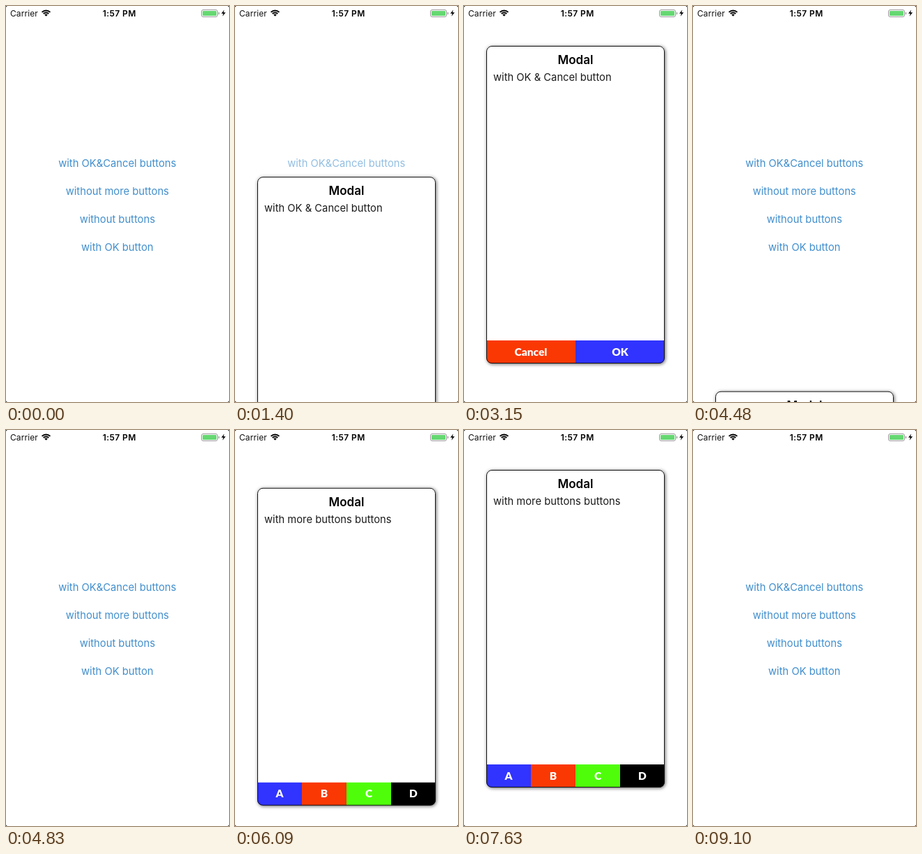
An HTML page with a canvas for the animation above (9.38 s loop, 320 by 566 pixels).

```html
<!DOCTYPE html>
<html lang="en">
<head>
<meta charset="utf-8">
<title>Modal demo</title>
<style>
  html, body { margin: 0; width: 100%; height: 100%; overflow: hidden; background: #000; }
  canvas { display: block; width: 320px; height: 566px; }
</style>
</head>
<body>
<canvas id="stage"></canvas>
<script>
const W = 320, H = 566, LOOP = 9380;
const canvas = document.getElementById('stage');
const ctx = canvas.getContext('2d');
const dpr = window.devicePixelRatio || 1;
canvas.width = W * dpr;
canvas.height = H * dpr;

const RED = '#fa3803', BLUE = '#3134fe', GREEN = '#4ffd0a', BLACK = '#000';
const links = ['with OK&Cancel buttons', 'without more buttons', 'without buttons', 'with OK button'];
const modals = [
  { link: 0, press: 1190, release: 1260, open: 1275, close: 4285,
    body: 'with OK & Cancel button', buttons: [['Cancel', RED], ['OK', BLUE]] },
  { link: 1, press: 5670, release: 5810, open: 5825, close: 8625,
    body: 'with more buttons buttons', buttons: [['A', BLUE], ['B', RED], ['C', GREEN], ['D', BLACK]] },
];

// Critically damped spring from 0 to 1, time in ms.
function spring(ms) {
  const x = Math.max(0, ms) * 0.01826;
  return 1 - (1 + x) * Math.exp(-x);
}

function text(str, x, y, font, color, align = 'center', spacing = 0) {
  ctx.font = font;
  ctx.fillStyle = color;
  ctx.textAlign = align;
  ctx.letterSpacing = spacing + 'px';
  ctx.fillText(str, x, y);
}

function roundRect(x, y, w, h, r) {
  ctx.beginPath();
  ctx.roundRect(x, y, w, h, r);
}

function drawStatusBar() {
  text('Carrier', 6, 14.5, '12px Inter, sans-serif', '#111', 'left', 0.1);
  text('1:57 PM', 162.7, 14.5, '600 12px Inter, sans-serif', BLACK, 'center', 0.4);

  // Wi-Fi
  const cx = 57.5, cy = 14.8, from = -Math.PI * 0.75, to = -Math.PI * 0.25;
  ctx.fillStyle = ctx.strokeStyle = BLACK;
  ctx.lineWidth = 2;
  for (const r of [8.4, 5.3]) {
    ctx.beginPath();
    ctx.arc(cx, cy, r, from, to);
    ctx.stroke();
  }
  ctx.beginPath();
  ctx.moveTo(cx, cy);
  ctx.arc(cx, cy, 3.2, from, to);
  ctx.fill();

  // Battery
  ctx.strokeStyle = '#999';
  ctx.lineWidth = 1;
  roundRect(280.5, 5.5, 23, 10, 2.5);
  ctx.stroke();
  ctx.fillStyle = '#65d872';
  roundRect(282, 7, 20, 7, 1.2);
  ctx.fill();
  ctx.fillStyle = '#999';
  roundRect(304.8, 8.7, 1.4, 3.6, [0, 1, 1, 0]);
  ctx.fill();

  ctx.fillStyle = BLACK;
  ctx.fill(new Path2D('M313.2 5.5 309 10.8H311.8L310.6 14.8 315.2 9.3H312.2Z'));
}

function linkAlpha(index, t) {
  const modal = modals.find(m => m.link === index);
  if (!modal || t < modal.press || t > modal.release + 300) return 1;
  return 0.2 + 0.8 * Math.max(0, (t - modal.release) / 300);
}

function drawLinks(t) {
  links.forEach((label, i) => {
    ctx.globalAlpha = linkAlpha(i, t);
    text(label, 159.8, 229.7 + i * 40, '14.75px Inter, sans-serif', '#428fcd');
  });
  ctx.globalAlpha = 1;
}

function drawModal({ open, close, body, buttons }, t) {
  if (t < open) return;
  const drop = H * (1 - spring(t - open) + spring(t - close));
  if (drop > H - 50) return;

  ctx.save();
  ctx.translate(0, drop);

  ctx.save();
  ctx.shadowColor = 'rgba(0,0,0,.6)';
  ctx.shadowBlur = 5 * dpr;
  ctx.shadowOffsetX = ctx.shadowOffsetY = dpr;
  ctx.fillStyle = '#fff';
  roundRect(32, 57, 256, 454, 8);
  ctx.fill();
  ctx.restore();

  text('Modal', 160, 83, '600 17px Inter, sans-serif', BLACK);
  text(body, 42, 107, '14.75px Inter, sans-serif', '#1c1c1c', 'left');

  ctx.save();
  roundRect(32, 57, 256, 454, 8);
  ctx.clip();
  const w = 256 / buttons.length;
  buttons.forEach(([label, color], i) => {
    const x = 32 + i * w;
    ctx.fillStyle = color;
    ctx.fillRect(x, 478, w, 33);
    text(label, x + w / 2, 499.5, '900 15.5px Lato, sans-serif', '#fff');
  });
  ctx.restore();

  ctx.strokeStyle = '#111';
  ctx.lineWidth = 1;
  roundRect(32.5, 57.5, 255, 453, 7.5);
  ctx.stroke();
  ctx.restore();
}

function draw(now) {
  const t = now % LOOP;
  ctx.setTransform(dpr, 0, 0, dpr, 0, 0);
  ctx.fillStyle = BLACK;
  ctx.fillRect(0, 0, W, H);
  ctx.fillStyle = '#fff';
  roundRect(0, 0, W, H, 2.5);
  ctx.fill();
  drawLinks(t);
  drawStatusBar();
  modals.forEach(modal => drawModal(modal, t));
  requestAnimationFrame(() => draw(performance.now() - start));
}

const start = performance.now();
draw(0);
</script>
</body>
</html>
```
